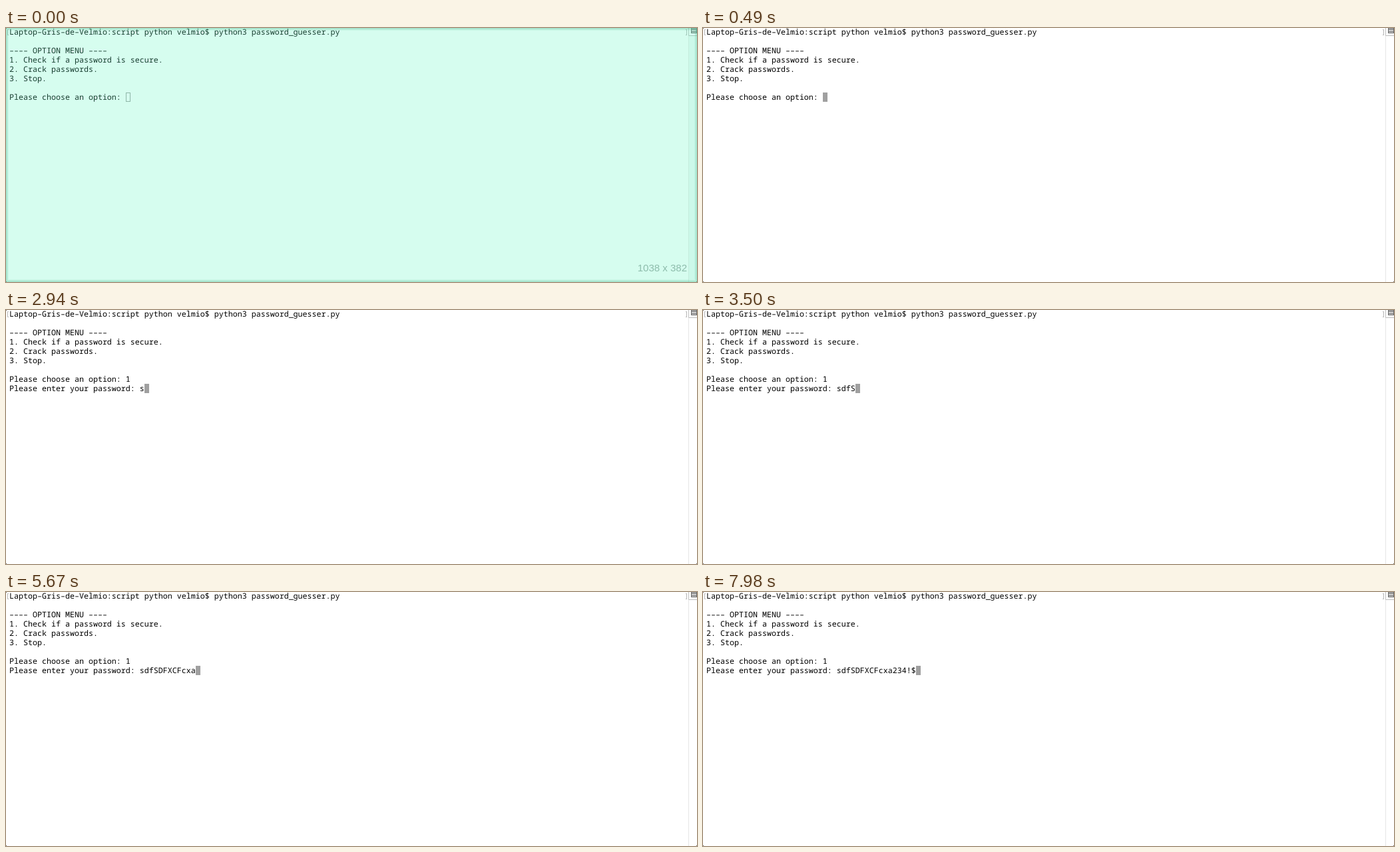
Recreate the animation shown at these times as an HTML page. Size 1038 px wide and 382 px high, loop 8000 ms.

```html
<!DOCTYPE html>
<html lang="en">
<head>
<meta charset="utf-8">
<title>Terminal session</title>
<style>
  html, body { margin: 0; width: 100%; height: 100%; overflow: hidden; background: #fff; }
  svg { display: block; width: 100vw; height: 100vh; }
  .row { font: 11.667px "Noto Sans Mono", "DejaVu Sans Mono", monospace; white-space: pre; fill: #000; text-rendering: geometricPrecision; }
  .size { font: 15px "Liberation Sans", Arial, sans-serif; fill: #8dbcab; text-anchor: end; }
</style>
</head>
<body>
<svg viewBox="0 0 1038 382">
  <rect width="1038" height="382" fill="#fff"/>

  <g id="chrome" fill="none">
    <path d="M4 2.5H2.5V10.5H4M1021 2.5H1022.5V10.5H1021" stroke="#b5b5b5"/>
    <path d="M1025.5 0V382" stroke="#e6e6e6"/>
    <path d="M1025.5 0V11.5H1038" stroke="#bdbdbd"/>
    <rect x="1029.5" y=".5" width="8" height="7" fill="#d8d8d8" stroke="#666"/>
    <path d="M1030 2.5H1037M1030 5.5H1037" stroke="#666"/>
    <path d="M0 .5H1M0 381.5H1M1037 381.5H1038" stroke="#555"/>
  </g>

  <g id="rows"></g>
  <rect id="cursor" width="6" height="13" stroke="#a0a0a0"/>

  <g id="capture">
    <rect width="1038" height="382" fill="#5bf7bf" fill-opacity=".25"/>
    <rect x="1026" y="12" width="10" height="366" fill="#5fc8a4" fill-opacity=".08"/>
    <g id="glow" fill="none" stroke="#4fb893"></g>
    <text class="size" x="1023" y="366">1038 x 382</text>
  </g>
</svg>
<script>
  const LOOP = 8000, CELL = 7, LINE = 14, LEFT = 5;
  const SCREEN = [
    "Laptop–Gris–de–Velmio:script python velmio$ python3 password_guesser.py",
    "",
    "–––– OPTION MENU ––––",
    "1. Check if a password is secure.",
    "2. Crack passwords.",
    "3. Stop.",
    ""
  ];
  const CHOOSE = "Please choose an option: ";
  const ENTER = "Please enter your password: ";
  const PASSWORD = "sdfSDFXCFcxa234!$";
  const KEY_TIMES = [2940, 3010, 3080, 3500, 3640, 3780, 4060, 4410, 4620,
    4970, 5250, 5670, 6650, 6930, 7210, 7630, 7980];
  const CAPTURE_END = 70, FOCUS = 490, PICK = 1540, SUBMIT = 1680;

  const byId = id => document.getElementById(id);
  const cursor = byId("cursor"), capture = byId("capture");

  function add(parent, tag, attrs) {
    const el = document.createElementNS("http://www.w3.org/2000/svg", tag);
    for (const key in attrs) el.setAttribute(key, attrs[key]);
    return parent.appendChild(el);
  }

  function addRow(text, i) {
    const el = add(byId("rows"), "text", { class: "row", x: LEFT, y: i * LINE + 10 });
    el.textContent = text;
    return el;
  }

  SCREEN.forEach(addRow);
  const chooseRow = addRow(CHOOSE, SCREEN.length);
  const enterRow = addRow("", SCREEN.length + 1);

  // Soft inner edge of the capture overlay
  [.38, .3, .2, .08].forEach((opacity, i) => add(byId("glow"), "rect", {
    x: i + .5, y: i + .5, width: 1037 - 2 * i, height: 381 - 2 * i, "stroke-opacity": opacity
  }));

  function setText(el, text) {
    if (el.textContent !== text) el.textContent = text;
  }

  function draw(t) {
    const typed = KEY_TIMES.filter(k => k <= t).length;
    const choose = CHOOSE + (t >= PICK ? "1" : "");
    const enter = t >= SUBMIT ? ENTER + PASSWORD.slice(0, typed) : "";
    const row = SCREEN.length + (enter ? 1 : 0);

    setText(chooseRow, choose);
    setText(enterRow, enter);
    cursor.setAttribute("x", LEFT + (enter || choose).length * CELL + .5);
    cursor.setAttribute("y", row * LINE - .5);
    cursor.setAttribute("fill", t < FOCUS ? "none" : "#a0a0a0");
    capture.setAttribute("visibility", t < CAPTURE_END ? "visible" : "hidden");
  }

  const start = performance.now();
  function tick() {
    draw((performance.now() - start) % LOOP);
    requestAnimationFrame(tick);
  }
  tick();
</script>
</body>
</html>
```
